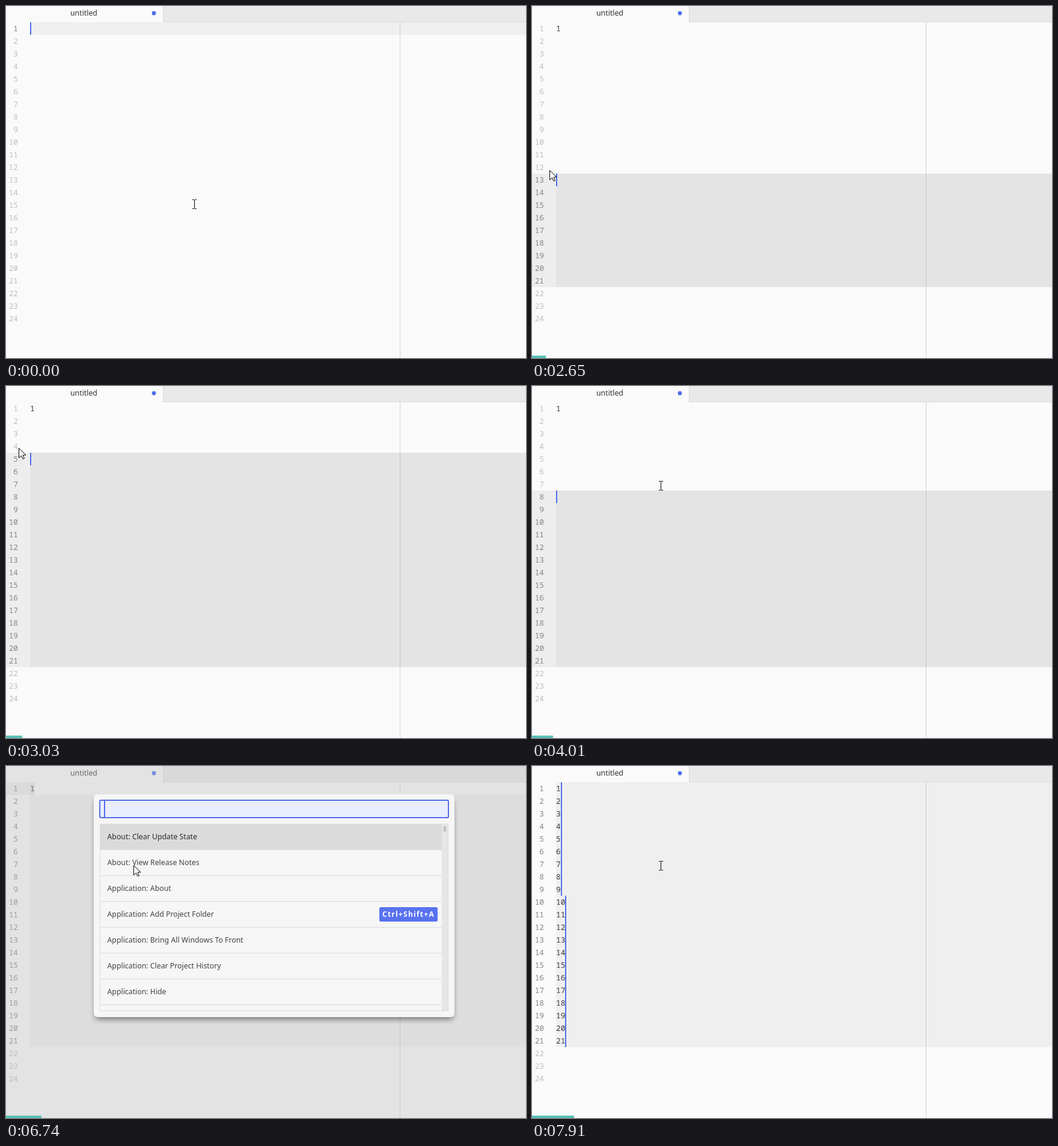
These frames come from a looping animation (865x586 px, 8 s). An HTML page with a canvas:

```html
<!DOCTYPE html>
<html lang="en">
<head>
<meta charset="utf-8">
<title>Editor</title>
<style>
html, body { margin: 0; width: 100%; height: 100%; overflow: hidden; background: #fafafa; }
canvas { display: block; }
</style>
</head>
<body>
<canvas id="stage" width="865" height="586"></canvas>
<script>
const W = 865, H = 586, LOOP = 8000;
const TOP = 27, ROW = 21, LEFT = 40, LAST = 21;
const TYPE = 700, PRESS = 2210, RELEASE = 3200, SPLIT = 4600, OPEN = 6680, DONE = 7840;
const BLUE = '#4f6eea', INK = '#383a42';
const MONO = '12.8px "Noto Sans Mono", monospace';
const UI = '12.3px "Noto Sans", "Open Sans", sans-serif';

const ctx = document.getElementById('stage').getContext('2d', { alpha: false });

// time, x, y of the pointer
const path = [
  [0, 313, 330], [1110, 313, 330], [1770, 258, 352], [2150, 30, 458],
  [2250, 30, 458], [2810, 29, 199], [3200, 14, 29], [3400, 14, 29],
  [3950, 214, 166], [LOOP, 214, 166]
];

const commands = [
  'About: Clear Update State', 'About: View Release Notes', 'Application: About',
  'Application: Add Project Folder', 'Application: Bring All Windows To Front',
  'Application: Clear Project History', 'Application: Hide'
];

function rect(x, y, w, h, color) {
  ctx.fillStyle = color;
  ctx.fillRect(x, y, w, h);
}

function round(x, y, w, h, r, color) {
  ctx.fillStyle = color;
  ctx.beginPath();
  ctx.roundRect(x, y, w, h, r);
  ctx.fill();
}

function text(str, x, y, font, color, align = 'left') {
  ctx.font = font;
  ctx.fillStyle = color;
  ctx.textAlign = align;
  ctx.fillText(str, x, y);
}

const rowY = line => TOP + (line - 1) * ROW;
const blink = (t, since) => (t - since) % 800 < 400;

function pointerAt(t) {
  let i = 1;
  while (i < path.length - 1 && t >= path[i][0]) i++;
  const [t0, x0, y0] = path[i - 1], [t1, x1, y1] = path[i];
  const k = (t - t0) / (t1 - t0);
  return { x: x0 + (x1 - x0) * k, y: y0 + (y1 - y0) * k };
}

function caret(line, chars) {
  rect(LEFT + Math.round(chars * 7.7), rowY(line), 2, ROW, BLUE);
}

function drawTabs() {
  rect(262, 0, W - 262, 26, '#e9e9e9');
  rect(262, 26, W - 262, 1, '#dbdbdb');
  rect(261, 0, 1, 27, '#d8d8d8');
  text('untitled', 107, 16, UI, '#333333');
  ctx.fillStyle = BLUE;
  ctx.beginPath();
  ctx.arc(246, 12, 3.4, 0, 7);
  ctx.fill();
}

function drawEditor(t, pointer) {
  const typed = t >= TYPE, dragged = t >= PRESS && t < SPLIT;
  const split = t >= SPLIT, done = t >= DONE;
  let first = 1, last = 1;

  if (dragged) {
    last = LAST;
    first = Math.max(1, Math.min(LAST, Math.floor((pointer.y - 9) / ROW) + 1));
    const h = (last - first + 1) * ROW;
    rect(0, rowY(first), LEFT, h, '#ededed');
    rect(LEFT, rowY(first), W - LEFT, h, '#e4e4e5');
  } else if (split) {
    last = LAST;
    const from = done ? 1 : 2;
    rect(LEFT, rowY(from), W - LEFT, (last - from + 1) * ROW, '#efefef');
    if (!done) {
      rect(0, TOP, LEFT, ROW, '#ededed');
      rect(LEFT, TOP, 8, ROW, '#e4e4e5');
    }
  } else {
    rect(LEFT, TOP, W - LEFT, ROW, '#efefef');
  }

  rect(655, TOP, 1, H - TOP, 'rgba(56,58,66,.2)');

  for (let n = 1; n <= 24; n++) {
    const active = n >= first && n <= last;
    text(n, 20, rowY(n) + 15, MONO, active ? '#858585' : '#bfbfbf', 'right');
  }

  const filled = done ? LAST : typed ? 1 : 0;
  for (let n = 1; n <= filled; n++) text(n, LEFT, rowY(n) + 15, MONO, INK);

  if (dragged) {
    if (t < RELEASE || blink(t, RELEASE)) caret(first, 0);
  } else if (split) {
    const lit = done || (t < OPEN && blink(t, SPLIT));
    for (let n = 1; lit && n <= LAST; n++) {
      caret(n, done ? String(n).length : n === 1 ? 1 : 0);
    }
  } else if (blink(t, typed ? TYPE : 0)) {
    caret(1, typed ? 1 : 0);
  }
}

function drawPalette(t) {
  const k = Math.min(1, (t - OPEN) / 240);
  const fade = 0.66 * (1 - (1 - k) ** 3);
  rect(0, 0, W, H, `rgba(190,190,190,${fade})`);

  ctx.save();
  ctx.shadowColor = 'rgba(0,0,0,.45)';
  ctx.shadowBlur = 10;
  ctx.shadowOffsetY = 6;
  round(148, 50, 596, 366, 6, '#f6f6f6');
  ctx.restore();
  round(146, 47, 600, 371, 6, '#f6f6f6');

  round(155, 56, 582, 31, 3, '#566fe6');
  round(157, 58, 578, 27, 1.5, '#e9edff');
  if (blink(t, OPEN)) rect(163, 58, 2, 27, BLUE);

  rect(156, 96, 580, 312, '#dcdcdc');
  rect(157, 97, 568, 310, '#f6f6f6');
  rect(157, 97, 568, 42, '#dbdbdb');
  rect(725, 97, 10, 310, '#e6e6e6');
  round(727.5, 100, 5, 10, 2.5, '#c4c4c4');
  commands.forEach((name, i) => {
    const y = 97 + i * 43;
    rect(157, y + 42, 568, 1, '#dcdcdc');
    text(name, 168.5, y + 25, UI, i ? '#424349' : '#2b2b2e');
  });

  round(621, 235, 97, 24, 2.5, '#5872f0');
  ctx.letterSpacing = '1.25px';
  text('Ctrl+Shift+A', 626, 251, 'bold 12px "Noto Sans", "Open Sans", sans-serif', '#ffffff');
  ctx.letterSpacing = '0px';
}

function drawArrow(x, y) {
  ctx.beginPath();
  [[0, 0], [0, 16], [4, 12.5], [6.5, 18], [9, 17], [6.5, 11.5], [11.5, 11.5]]
    .forEach(([dx, dy]) => ctx.lineTo(x + dx + 0.5, y + dy + 0.5));
  ctx.closePath();
  ctx.fillStyle = '#ffffff';
  ctx.fill();
  ctx.strokeStyle = '#000000';
  ctx.lineWidth = 1;
  ctx.stroke();
}

function drawBeam(x, y) {
  for (const dy of [-8, 7]) {
    rect(x - 3, y + dy, 3, 1, '#000000');
    rect(x + 1, y + dy, 3, 1, '#000000');
  }
  rect(x, y - 7, 1, 14, '#000000');
}

function draw(t) {
  const pointer = pointerAt(t);
  const open = t >= OPEN && t < DONE;
  const x = Math.round(pointer.x), y = Math.round(pointer.y);

  rect(0, 0, W, H, '#fafafa');
  drawTabs();
  drawEditor(t, pointer);
  if (open) drawPalette(t);
  if (open) drawArrow(x - 2, y - 1);
  else if (x < LEFT) drawArrow(x, y);
  else drawBeam(x, y);
  rect(0, 582, Math.round(t * 0.0088), 4, '#58c1b9');
}

const start = performance.now();
function tick() {
  draw((performance.now() - start) % LOOP);
  requestAnimationFrame(tick);
}
tick();
</script>
</body>
</html>
```
